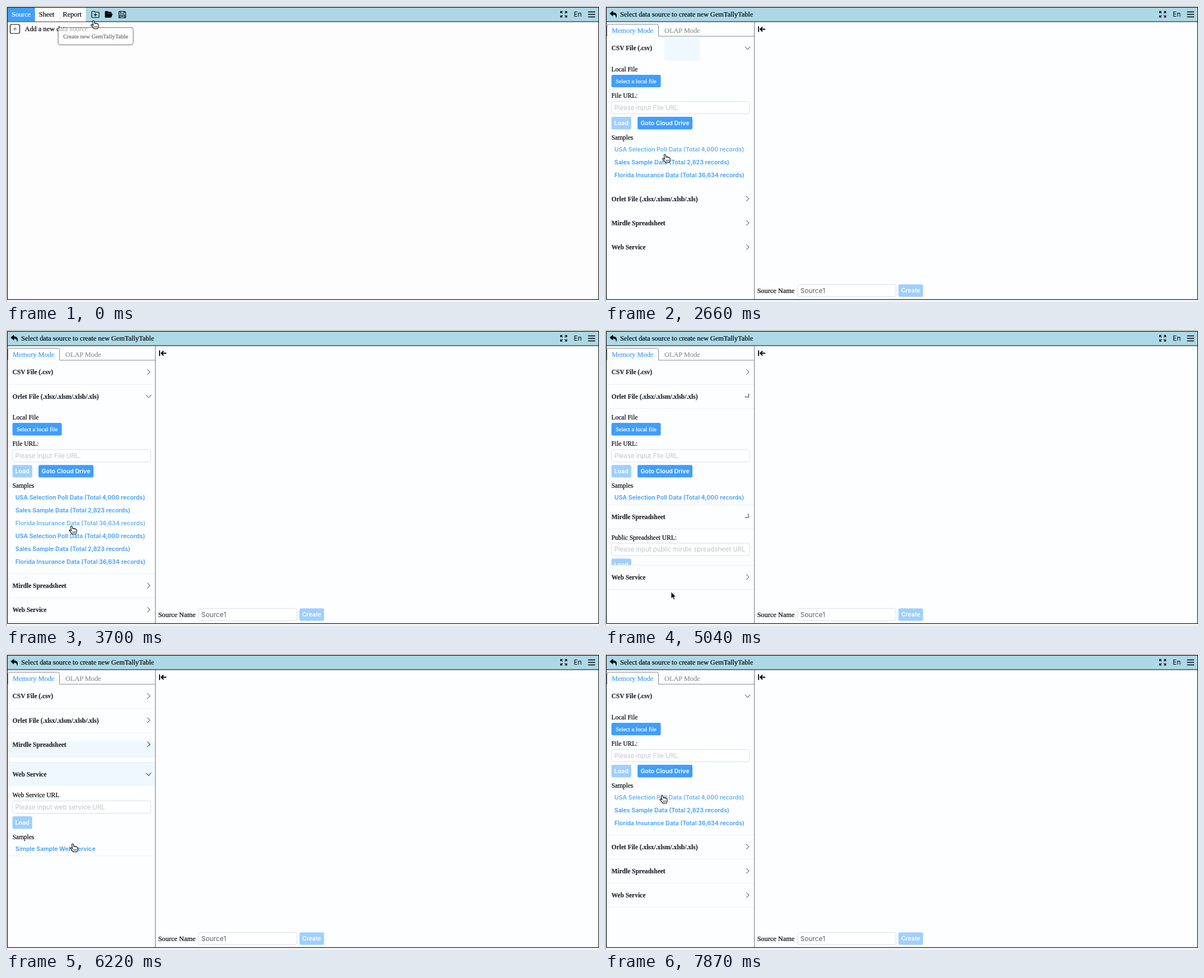
Write an HTML page that moves like this. It is 1058 px wide and 529 px high and loops after 8 s.

```html
<!DOCTYPE html>
<html lang="en">
<head>
<meta charset="utf-8">
<title>Data source panel</title>
<style>
html, body { margin: 0; width: 100%; height: 100%; overflow: hidden; background: #f2f2f2; }
#stage { display: block; width: 1058px; height: 529px; }
text {
  font: 12.34px "Liberation Serif", "Times New Roman", serif; white-space: pre;
  color: #000; fill: currentColor; stroke: currentColor; stroke-width: .2px;
}
.label { font-size: 11.46px; }
.head { font-size: 11.46px; font-weight: 700; color: #222730; }
.small { font-size: 10.58px; }
.ui, .hint, .value { font-family: Inter, "Noto Sans", sans-serif; stroke: none; }
.ui { font-size: 10.58px; font-weight: 600; }
.hint { font-size: 11.4px; color: #c0c4cc; }
.value { font-size: 11.9px; color: #606266; }
</style>
</head>
<body>
<svg id="stage" viewBox="0 0 1058 529"></svg>
<script>
const LOOP = 8000, STEP = 148.15, LAST_STEP = 53;
const HEADER = 43.2, TOP = 54.2;
const BLUE = '#409eff', PALE = '#a0cfff', HOVER = '#66b1ff', RULE = '#ebeef5', TINT = '#f0f8ff';

const stage = document.getElementById('stage');

function el(parent, tag, attrs = {}, content) {
  const node = document.createElementNS('http://www.w3.org/2000/svg', tag);
  set(node, attrs);
  if (content) node.textContent = content;
  return parent.appendChild(node);
}
function set(node, attrs) {
  for (const name in attrs) node.setAttribute(name, attrs[name]);
}
const group = (parent, attrs) => el(parent, 'g', attrs);
const rect = (parent, x, y, width, height, fill, more) =>
  el(parent, 'rect', { x, y, width, height, fill, ...more });
const path = (parent, d, width = 1.2, stroke = '#000', fill = 'none') =>
  el(parent, 'path', { d, fill, stroke, 'stroke-width': width, 'stroke-linejoin': 'round' });
const text = (parent, x, y, content, cls = '', color, anchor = 'start') => {
  const node = el(parent, 'text', { x, y, class: cls, 'text-anchor': anchor }, content);
  if (color) node.style.color = color;
  return node;
};
function button(parent, x, y, width, label, fill, cls = 'ui') {
  rect(parent, x, y, width, 22.3, fill, { rx: 2.5 });
  text(parent, x + width / 2, y + 14.8, label, cls, '#fff', 'middle');
}
function field(parent, x, y, width, content, cls) {
  rect(parent, x, y, width, 22, '#fff', { rx: 3.5, stroke: '#dcdfe6' });
  text(parent, x + 5, y + 15.2, content, cls);
}

// Window frame and toolbar
rect(stage, 0, 0, 1058, 2, '#d0d0d0');
rect(stage, 0, 0, 2, 529, '#d0d0d0');
rect(stage, 2.5, 2.5, 1055, 522, '#fdfdfd', { stroke: '#000' });
rect(stage, 3, 3, 1054, 25, '#add8e6');
path(stage, 'M3 28H1057', 1);
path(stage, 'M993 9.5H989.5V13M997 9.5H1000.5V13M993 20H989.5V16.5M997 20H1000.5V16.5' +
  'M989.5 9.5L993 13M1000.5 9.5L997 13M989.5 20L993 16.5M1000.5 20L997 16.5');
text(stage, 1013, 19, 'En', 'value', '#000');
path(stage, 'M1038.500 10.500H1051M1038.500 15H1051M1038.500 19.500H1051', 1.6);

// First page
const home = group(stage);
rect(home, 3, 3, 48.5, 24.5, BLUE);
rect(home, 52, 3, 44.5, 24.5, '#fff');
rect(home, 97, 3, 45.5, 24.5, '#fff');
text(home, 27, 19, 'Source', '', '#fff', 'middle');
text(home, 72.5, 19, 'Sheet', '', '', 'middle');
text(home, 118, 19, 'Report', '', '', 'middle');
path(home, 'M153 10.5Q153 9.5 154 9.5H157.5L159 11H165Q166 11 166 12V19.5Q166 20.5 165 20.5H154Q153 20.5 153 19.5Z' +
  'M159.5 13V18.5M156.7 15.7H162.3');
path(home, 'M177 18V10.5Q177 9.5 178 9.5H181.5L183 11H187Q188 11 188 12V13H180L177 20Z', 1, '#000', '#000');
path(home, 'M180 14H190L187.5 20.5H177Z', .6, '#000', '#000');
path(home, 'M201.5 9.5H211.5L213.5 11.5V21H201.5ZM204 9.5V13H210.5V9.5M203.5 21V16H211.5V21M205 18.3H210');
rect(home, 7.5, 33, 17, 16, '#fff', { rx: 2.5, stroke: '#000', 'stroke-width': 1.1 });
path(home, 'M12.5 41H19.5M16 37.5V44.5', .9, '#555');
text(home, 33.5, 45, 'Add a new data source');
const tooltip = group(home);
rect(tooltip, 93, 38.5, 134, 31, '#fff', { rx: 4, stroke: '#303133' });
text(tooltip, 160, 57.8, 'Create new GemTallyTable', 'small', '#303133', 'middle');

// Second page
const picker = group(stage);
rect(picker, 3, 29, 1054, 495, '#fcfeff');
path(picker, 'M14 9L8.5 13.5L14 18V15.2C18 15 19.8 16.8 20 20.5C22 15 19.5 11.8 14 11.8Z', .6, '#000', '#000');
text(picker, 27, 18.8, 'Select data source to create new GemTallyTable');
path(picker, 'M266.5 29V524', 1, '#777');
path(picker, 'M3.5 54V36Q3.5 32.5 7 32.5H92Q95.5 32.5 95.5 36V54H266', 1, '#888');
text(picker, 12, 47.8, 'Memory Mode', '', BLUE);
text(picker, 106, 47.8, 'OLAP Mode', '', '#909090');
path(picker, 'M274 36.5V46.5M286 41.5H277M281 37.5L277 41.5L281 45.5', 1.8);
text(picker, 271.5, 513, 'Source Name');
field(picker, 343.5, 497.5, 175.5, 'Source1', 'value');
button(picker, 523.5, 497.5, 44, 'Create', PALE);

const csvTint = rect(picker, 106, 56, 63.5, 41.5, TINT);
const passedTint = rect(picker, 3, 156, 263, 28, TINT);
const serviceTint = rect(picker, 3, 193, 263, HEADER, TINT);

// Accordion
const SAMPLES = ['USA Selection Poll Data (Total 4,000 records)',
  'Sales Sample Data (Total 2,823 records)',
  'Florida Insurance Data (Total 36,634 records)'];
const FILE_HINT = 'Please input File URL.';

function makePanel(title, urlLabel, hint, samples, isFile) {
  const head = group(picker);
  text(head, 11.5, 25.3, title, 'head');
  const arrow = path(head, 'M-2.5 -4.6L2.5 0L-2.5 4.6', 1, '#303133');
  const headRule = rect(head, 3, HEADER - .7, 263, 1, RULE);

  const shift = isFile ? 47.7 : 0;
  const height = 109.4 + shift + 23 * samples.length;
  const body = el(picker, 'svg', { x: 0, width: 266 });
  if (isFile) {
    text(body, 11.5, 19.2, 'Local File', 'label');
    button(body, 11.5, 25.5, 88, 'Select a local file', BLUE, 'small');
  }
  text(body, 11.5, 19.2 + shift, urlLabel, 'label');
  field(body, 11.5, 25.5 + shift, 246.5, hint, 'hint');
  button(body, 11.5, 53 + shift, 35.3, 'Load', PALE);
  if (isFile) button(body, 58, 53 + shift, 98, 'Goto Cloud Drive', BLUE);
  text(body, 11.5, 94 + shift, 'Samples', 'label');
  const links = samples.map((name, i) => {
    const y = 111 + shift + 23 * i;
    return { y, node: text(body, 16.8, y + 3.8, name, 'ui', BLUE) };
  });
  const bodyRule = rect(picker, 3, 0, 263, 1, RULE);
  return { head, arrow, headRule, body, bodyRule, height, links };
}

const panels = [
  makePanel('CSV File (.csv)', 'File URL:', FILE_HINT, SAMPLES, true),
  makePanel('Orlet File (.xlsx/.xlsm/.xlsb/.xls)', 'File URL:', FILE_HINT, [...SAMPLES, ...SAMPLES], true),
  makePanel('Mirdle Spreadsheet', 'Public Spreadsheet URL:',
    'Please input public mirdle spreadsheet URL', SAMPLES.slice(0, 2), false),
  makePanel('Web Service', 'Web Service URL', 'Please input web service URL.',
    ['Simple Sample Web Service'], false)
];

// Pointers, with the hot spot at 0,0
const pointer = group(stage);
const hand = group(pointer, { transform: 'translate(0 .8)' });
path(hand, 'M-1.6 .8C-1.7 -.8 .8 -1 1.2 .6L2.2 4.6C2.6 3.5 4.3 3.6 4.6 4.7' +
  'C5.2 4 6.6 4.2 6.9 5.3C7.8 4.8 8.8 5.4 8.9 6.6L9 9.5C9 11.5 7.8 12.3 7.6 14' +
  'H1C.2 12 -2.5 9.8 -3.9 7.9C-4.7 6.6 -3 5.7 -1.8 6.8L-.4 8Z', 1.1, '#000', '#fff');
path(hand, 'M2.2 9V12M4.2 9V12M6.2 9V12', .8);
const arrowPointer = path(pointer, 'M0 0V12L2.8 9.5L4.7 14L6.7 13.1L4.8 8.8H8.5Z', .8, '#fff', '#000');

// Panel opened at a step
const OPENED = [[-9, 0], [22, 1], [34, 2], [41, 3], [49, 0]];
const OPENING = [.418, .935, 1];
// step, x, y, hand
const MOVES = [
  [0, 156, 26, 1], [1, 157, 21, 1], [2, 157, 19, 1], [4, 157, 19, 1], [5, 150, 40, 0],
  [6, 138, 80, 1], [7, 127, 195, 0], [9, 112, 240, 0], [11, 107, 263, 1], [17, 107, 263, 1],
  [18, 107, 265, 1], [20, 116, 330, 1], [21, 117, 350, 1], [25, 117, 350, 1],
  [33, 118, 449, 1], [34, 118, 468, 0], [36, 118, 440, 0], [38, 119, 360, 1],
  [39, 119, 345, 1], [41, 119, 345, 1], [42, 119, 339, 1], [43, 116, 300, 0],
  [45, 106, 130, 1], [46, 104, 76, 1], [50, 104, 76, 1], [51, 104, 120, 0], [53, 102, 252, 1]
];

function pointerAt(step) {
  const i = MOVES.findLastIndex(move => move[0] <= step);
  const [start, x, y, isHand] = MOVES[i];
  const next = MOVES[i + 1] || MOVES[i];
  const f = next[0] > start ? (step - start) / (next[0] - start) : 0;
  return { x: x + (next[1] - x) * f, y: y + (next[2] - y) * f, isHand };
}

function opennessAt(step) {
  const i = OPENED.findLastIndex(event => event[0] <= step);
  const [start, current] = OPENED[i];
  const p = OPENING[Math.min(step - start, 2)];
  const open = [0, 0, 0, 0];
  if (i) open[OPENED[i - 1][1]] = 1 - p;
  open[current] = p;
  return open;
}

const show = (node, visible) => { node.style.display = visible ? '' : 'none'; };

function drawPanels(step, mouse) {
  const open = opennessAt(step);
  const ruled = step >= 19;
  let y = TOP;
  panels.forEach((panel, i) => {
    const p = open[i], shown = panel.height * p;
    set(panel.head, { transform: `translate(0 ${y})` });
    set(panel.arrow, { transform: `translate(254.5 21) rotate(${90 * p})` });
    show(panel.headRule, ruled && p < .9);
    y += HEADER;
    set(panel.body, { y, height: shown });
    show(panel.body, p > 0);
    for (const link of panel.links) {
      const over = mouse.isHand && p === 1 && Math.abs(mouse.y - y - link.y) < 11.5;
      link.node.style.color = over ? HOVER : BLUE;
    }
    y += shown;
    set(panel.bodyRule, { y: y - .7 });
    show(panel.bodyRule, ruled && p > 0);
  });
}

function draw(time) {
  const step = Math.min(LAST_STEP, Math.floor((time + 12) / STEP));
  const mouse = pointerAt(step);
  show(home, step < 4);
  show(picker, step >= 4);
  set(tooltip, { opacity: [.7, .9, 1][Math.min(step, 2)] });
  show(csvTint, step >= 6 && step < 20);
  show(passedTint, step === 42);
  show(serviceTint, step === 42);
  drawPanels(step, mouse);
  set(pointer, { transform: `translate(${mouse.x} ${mouse.y})` });
  show(hand, mouse.isHand);
  show(arrowPointer, !mouse.isHand);
}

function tick() {
  draw(performance.now() % LOOP);
  requestAnimationFrame(tick);
}
tick();
</script>
</body>
</html>
```
